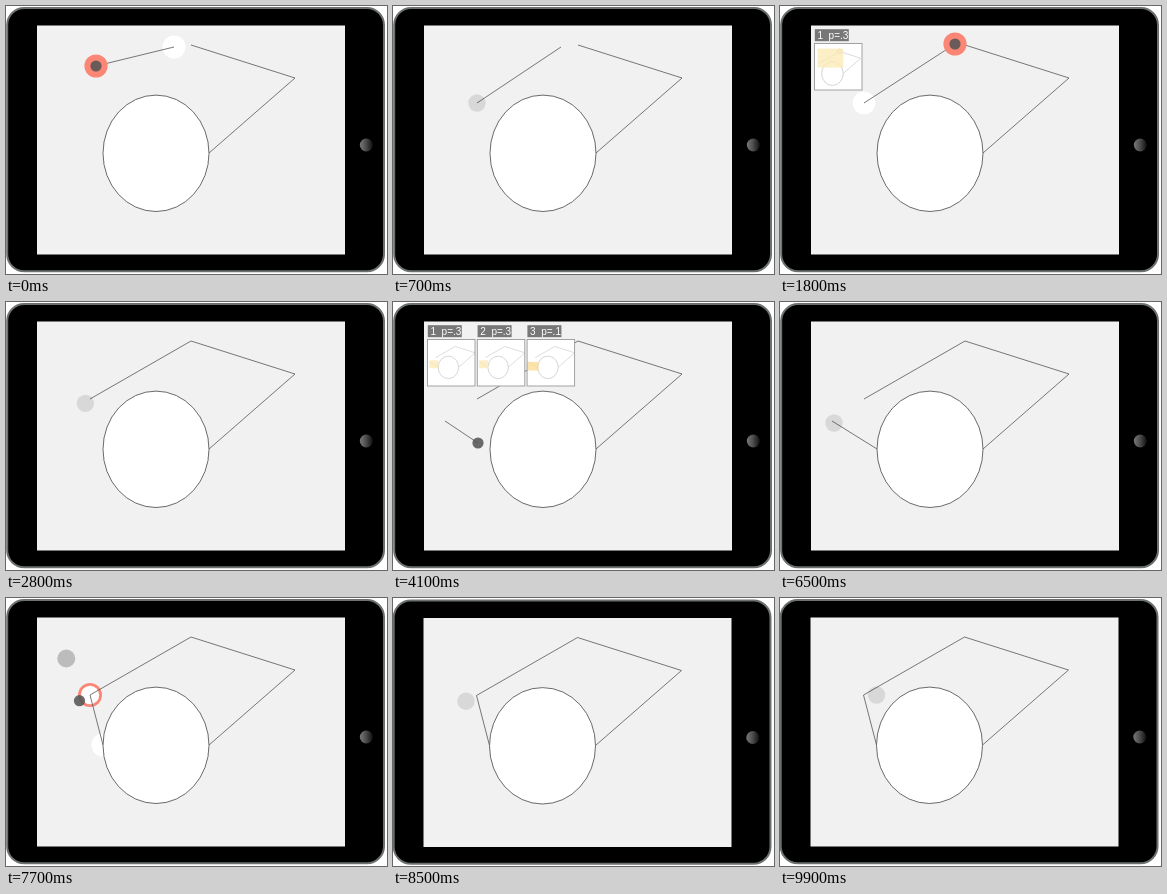
Recreate the animation shown at these times as an HTML page. Size 381x268 px, loop 10 s.

```html
<!DOCTYPE html>
<html lang="en">
<head>
<meta charset="utf-8">
<title>Sketch on a tablet</title>
<style>
  html, body { margin: 0; width: 100%; height: 100%; overflow: hidden; background: #fff; }
  svg { display: block; }
  text { font: 10px "Liberation Sans", Arial, sans-serif; fill: #fff; white-space: pre; }
</style>
</head>
<body>
<svg id="stage" width="381" height="268" viewBox="0 0 381 268">
  <defs>
    <linearGradient id="button">
      <stop offset="0" stop-color="#777"/>
      <stop offset=".45" stop-color="#505050"/>
      <stop offset="1" stop-color="#101010"/>
    </linearGradient>
  </defs>
  <g id="device">
    <rect x="1.2" y="2" width="376.8" height="263.3" rx="17" fill="#000" stroke="#6c7070" stroke-width="2"/>
    <rect x="31" y="19.5" width="308" height="229" fill="#f1f1f1"/>
    <circle cx="360.3" cy="139" r="6.5" fill="url(#button)"/>
    <g id="drawing"></g>
  </g>
</svg>
<script>
const LOOP = 10000, STEP = 100;
const device = document.getElementById('device');
const drawing = document.getElementById('drawing');

const LEFT = [84, 97], TOP = [185, 39], RIGHT = [289, 72];
const HEAD = [168, 41], START = [52, 119], JOIN = [97, 147];
const RED = '#fb8676';

// Each key: time, then values
const fingerPath = [
  [0, 90, 60], [300, 84, 97], [700, 84, 97], [1000, 168, 41], [1100, 168, 41],
  [1500, 175, 38], [2000, 175, 38], [2200, 185, 39], [2400, 185, 39],
  [2900, 53, 117], [3100, 53, 117], [3200, 52, 119], [3500, 85, 141],
  [5100, 85, 141], [5500, 89, 151], [5600, 89, 151], [6100, 63, 128],
  [6200, 63, 128], [6500, 54, 121], [6600, 54, 121], [7100, 72, 106],
  [7200, 72, 106], [7400, 73.5, 102.7], [8600, 73.5, 102.7], [9000, 80, 101.5],
  [9200, 80, 101.5], [9500, 97, 97]
];
const pressKeys = [
  [0, 1], [400, 1], [600, 0], [1000, 0], [1100, 1], [2300, 1], [2500, 0],
  [3100, 0], [3200, 1], [5300, 1], [5500, 0], [6600, 0], [6700, 1],
  [8000, 1], [8300, 0]
];

const mix = (a, b, k) => a + (b - a) * k;
const within = (t, a, b) => t >= a && t < b;

function sample(keys, t) {
  const i = keys.findIndex(k => k[0] > t);
  if (i < 0) return keys[keys.length - 1].slice(1);
  const a = keys[i - 1], b = keys[i];
  const k = (t - a[0]) / (b[0] - a[0]);
  return a.slice(1).map((v, n) => mix(v, b[n + 1], k));
}

const disc = ([x, y], r, fill, opacity = 1) =>
  `<circle cx="${x}" cy="${y}" r="${r}" fill="${fill}" fill-opacity="${opacity}"/>`;

const path = (points, stroke = '#606060', width = .85) =>
  `<polyline points="${points.join(' ')}" fill="none" stroke="${stroke}" stroke-width="${width}"/>`;

const oval = (stroke = '#505050', width = .85) =>
  `<ellipse cx="150" cy="147.3" rx="53" ry="58.2" fill="#fff" stroke="${stroke}" stroke-width="${width}"/>`;

// A suggestion card: label, miniature of the sketch and a highlighted area
function card(index, p, view, box, lines, extra = '', tint = '#fcebb8') {
  const x = 34.5 + index * 49.8;
  const [bx, by, bw, bh] = box;
  return `<rect x="${x + .3}" y="23.2" width="34" height="12" fill="#777"/>
    <text x="${x + 3}" y="32.8">${index + 1}  p=${p}</text>
    <rect x="${x}" y="37.5" width="47.5" height="46.5" fill="#fff"/>
    <svg x="${x}" y="37.5" width="47.5" height="46.5" viewBox="${view.join(' ')}">
      ${lines.map(l => path(l, '#c4c4c4', 3)).join('')}${oval('#b8b8b8', 3)}${extra}
      <rect x="${bx}" y="${by}" width="${bw}" height="${bh}" fill="${tint}" fill-opacity=".8"/>
    </svg>
    <rect x="${x}" y="37.5" width="47.5" height="46.5" fill="none" stroke="#999" stroke-width=".9"/>`;
}

function cards(t) {
  const outline = [LEFT, TOP, RIGHT, [203, 147]];
  const wide = [42, 3, 246, 241];
  if (within(t, 1300, 2100)) {
    const knob = '<circle cx="185" cy="39" r="11" fill="#eee" stroke="#bbb" stroke-width="4"/>';
    return card(0, '.3', [62, 0, 233, 228], [77, 25, 127, 93], [outline], knob);
  }
  if (within(t, 3800, 5200)) {
    const lines = [outline, [START, JOIN]];
    return card(0, '.3', wide, [51, 111, 47, 41], lines) +
      card(1, '.3', wide, [51, 111, 47, 41], lines) +
      card(2, '.1', wide, [42, 119, 59, 45], [outline, [START, [85, 141], JOIN]], '', '#fbdc98');
  }
  if (within(t, 6900, 7700))
    return card(0, '.3', wide, [72, 85, 37, 74], [outline, [LEFT, JOIN]]);
  return '';
}

function tap(t) {
  if (!within(t, 7300, 7900)) return '';
  const at = t < 7400 ? [70, 35] : [60.3, 60.5];
  return disc(at, 9, '#000', within(t, 7700, 7800) ? .22 : .1);
}

function render(t) {
  const finger = sample(fingerPath, t);
  const [press] = sample(pressKeys, t);
  const lines = [[TOP, RIGHT, [203, 147]]];
  let under = '', over = '';

  // Upper left side
  if (t < 1100) lines.push([HEAD, t < 500 ? finger : LEFT]);
  else lines.push([LEFT, t < 2200 ? finger : TOP]);

  // Lower left side: drawn, joined to the oval, then its free end is dragged
  if (t >= 3200) {
    const from = t < 6700 ? START : t < 7700 ? finger : LEFT;
    lines.push([from, t < 5300 ? finger : JOIN]);
  }

  // Anchored end in white, moving end in red
  if (t < 500) under += disc(HEAD, 11.5, '#fff');
  if (within(t, 1100, 2400)) under += disc(LEFT, 11.3, '#fff');
  if (within(t, 6700, 8100)) under += disc(JOIN, 11.5, '#fff');
  if (t < 500 || within(t, 1100, 2400) || within(t, 6700, 7700))
    over += disc(finger, 11.6, RED);
  if (within(t, 7700, 8100))
    under += disc(LEFT, 12, RED) + disc(LEFT, 9.2, '#fff');

  const touch = disc(finger, mix(8.7, 5.6, press), press ? '#555' : '#000', mix(.1, .88, press));
  drawing.innerHTML = under + lines.map(l => path(l)).join('') + oval() +
    over + touch + cards(t) + tap(t);

  const dx = t < 8500 ? 0 : -.5;
  const dy = t < 8500 ? 0 : mix(.5, 0, Math.min(1, Math.max(0, (t - 8600) / 400)));
  device.setAttribute('transform', `translate(${dx} ${dy})`);
}

const begin = performance.now();
let shown = -1;
function tick() {
  const t = Math.floor(((performance.now() - begin) % LOOP) / STEP) * STEP;
  if (t !== shown) render(shown = t);
  requestAnimationFrame(tick);
}
tick();
</script>
</body>
</html>
```
